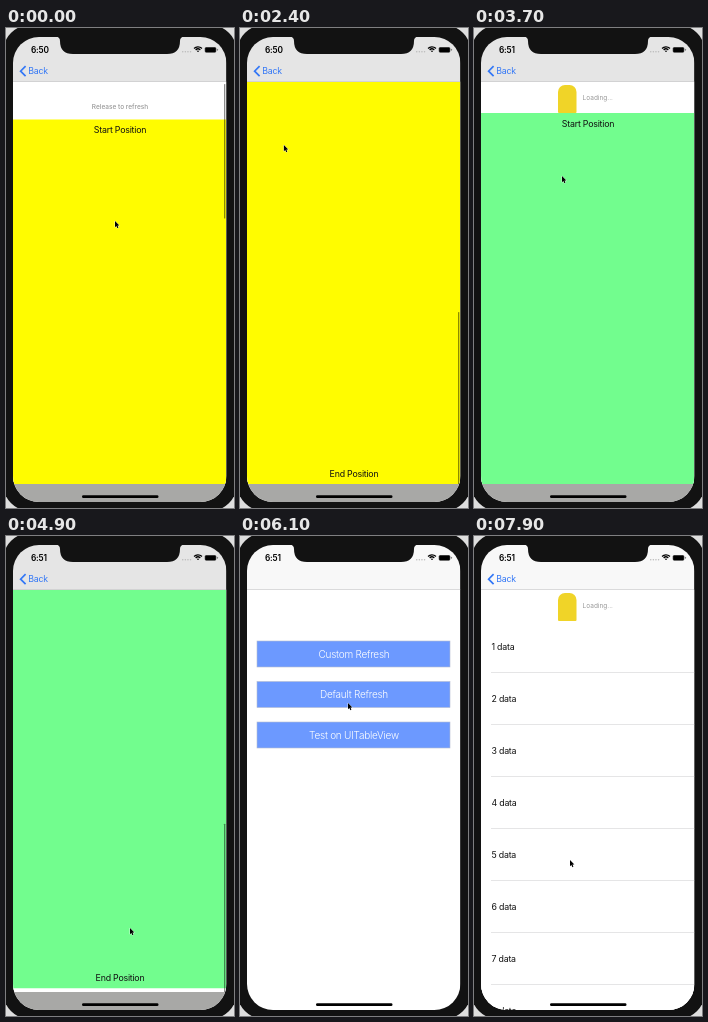
An HTML page with a canvas that plays this animation: 228 by 480 pixels, repeating every 8000 ms.

```html
<!DOCTYPE html>
<html lang="en">
<head>
<meta charset="utf-8">
<title>Pull to refresh demo</title>
<style>
  html, body { margin: 0; width: 100%; height: 100%; overflow: hidden; background: #dedede; }
  canvas { display: block; width: 228px; height: 480px; }
</style>
</head>
<body>
<canvas id="stage"></canvas>
<script>
const LOOP = 8000, STEP = 100, SLIDE = 460, PULL = 150;
const LEFT = 7, WIDTH = 213.4, TOP = 54, BOTTOM = 456, SCREEN_END = 474;
const CONTENT = 943, MAX = CONTENT - (BOTTOM - TOP), HEADER = 31;
const BEZEL = '#121212', BLUE = '#3478f6', INK = '#111', MUTED = '#999';

const canvas = document.getElementById('stage');
const ctx = canvas.getContext('2d');
const dpr = window.devicePixelRatio || 1;
canvas.width = 228 * dpr;
canvas.height = 480 * dpr;

// enter, pull and leave are start times; flick is the span of the scroll to the end.
const pages = [
  { color: '#fffc00', enter: -SLIDE, pull: -PULL, flick: [1000, 1980], leave: 2700 },
  { color: '#72fd8e', mascot: true, enter: 3200, pull: 3400, flick: [4400, 4976], leave: 5400 },
  { table: true, mascot: true, enter: 6500, pull: 7100, flick: [LOOP + 200, LOOP + 900], leave: LOOP }
];

// Time, x, y of the pointer's stops.
const stops = [
  [0, 109, 193], [1700, 116, 382], [2700, 24, 44], [3100, 42, 61], [3250, 94, 116], [3700, 88, 148],
  [4900, 124, 392], [5400, 24, 44], [6100, 108, 167], [6500, 108, 198], [7900, 96, 324]
];

function ramp(t, a, b) {
  const p = Math.min(1, Math.max(0, (t - a) / (b - a)));
  return p * p * (3 - 2 * p);
}

function slideOf(page, t) {
  const { enter, leave } = page;
  return WIDTH * (1 - ramp(t, enter, enter + SLIDE) + ramp(t, leave, leave + SLIDE));
}

function scrollOf(page, t) {
  const { pull, flick: [start, end] } = page;
  const open = ramp(t, pull, pull + PULL) - ramp(t, start - 200, start);
  const overshoot = 6.5 * Math.max(0, 1 - Math.abs(t - pull - PULL) / PULL);
  const down = (MAX + HEADER) * ramp(t, start, end);
  const footerClose = HEADER * ramp(t, end + 200, end + 400);
  return down - footerClose - HEADER * open - overshoot;
}

function pointer(t) {
  const i = Math.max(1, stops.findIndex(s => s[0] >= t));
  const [t0, x0, y0] = stops[i - 1], [t1, x1, y1] = stops[i];
  const p = ramp(t, t0, t1);
  return [x0 + (x1 - x0) * p, y0 + (y1 - y0) * p];
}

function box(x, y, w, h, fill) {
  ctx.fillStyle = fill;
  ctx.fillRect(x, y, w, h);
}

function round(x, y, w, h, r, fill) {
  ctx.beginPath();
  ctx.roundRect(x, y, w, h, r);
  ctx.fillStyle = fill;
  ctx.fill();
}

function text(str, x, y, size, fill, align = 'left', weight = 400) {
  ctx.font = `${weight} ${size}px Inter, "Liberation Sans", sans-serif`;
  ctx.letterSpacing = size > 7 ? `${-0.025 * size}px` : '0px';
  ctx.textAlign = align;
  ctx.fillStyle = fill;
  ctx.fillText(str, x, y + size * 0.36);
}

function clipTo(x, y, w, h, r, draw) {
  ctx.save();
  ctx.beginPath();
  ctx.roundRect(x, y, w, h, r);
  ctx.clip();
  draw();
  ctx.restore();
}

function menu(shift) {
  box(LEFT, TOP, WIDTH, SCREEN_END - TOP, '#fff');
  ['Custom Refresh', 'Default Refresh', 'Test on UITableView'].forEach((label, i) => {
    const y = 105 + i * 40.5;
    box(17 + shift, y, 193, 26, '#6c99ff');
    ctx.strokeStyle = '#b4bdd0';
    ctx.lineWidth = 0.6;
    ctx.strokeRect(17 + shift, y, 193, 26);
    text(label, 114 + shift, y + 13.2, 10, '#fff', 'center', 300);
  });
}

function header(page, t, top, pull) {
  const loading = t >= page.pull + PULL + 50;
  const label = loading ? 'Loading...' : pull >= HEADER ? 'Release to refresh' : 'Pull to refresh';
  if (page.mascot) {
    round(84, top - 28, 18.5, 28, [7, 7, 1, 1], '#f0d428');
    text(label, 108.6, top - 15.3, 6.5, MUTED);
  } else {
    text(label, 114, top - 12.9, 6.5, MUTED, 'center', 500);
  }
}

function scrollBar(scroll) {
  const over = Math.max(0, -scroll, scroll - MAX);
  const length = 172 - over;
  const y = 56 + Math.min(1, Math.max(0, scroll / MAX)) * (400 - length);
  round(218, y, 1.3, length, 0.6, 'rgba(0,0,0,.45)');
}

function rows(top) {
  for (let i = 0; i < 9; i++) {
    const y = top + i * 52;
    text(`${i + 1} data`, 17.5, y + 25.6, 8.8, INK);
    box(17, y + 51, 204, 0.6, '#d4d4d6');
  }
}

function block(page, t, scroll, top) {
  const end = top + CONTENT;
  box(LEFT, top, WIDTH, CONTENT, page.color);
  text('Start Position', 114, top + 10.4, 8.8, INK, 'center');
  text('End Position', 114, end - 10, 8.8, INK, 'center');
  if (scroll > MAX) text('Loading...', 114, end + 15, 6.5, MUTED, 'center');
  if (t >= page.flick[0] || -scroll > HEADER + 1) scrollBar(scroll);
}

function drawPage(page, t, slide) {
  const scroll = scrollOf(page, t), top = TOP - scroll;
  const bottom = page.table ? SCREEN_END : BOTTOM;
  ctx.save();
  ctx.translate(slide, 0);
  box(LEFT, TOP, WIDTH, SCREEN_END - TOP, page.table ? '#fff' : '#a8a8a6');
  clipTo(LEFT, TOP, WIDTH, bottom - TOP, 0, () => {
    box(LEFT, TOP, WIDTH, bottom - TOP, '#fff');
    if (page.table) rows(top);
    else block(page, t, scroll, top);
    if (scroll < 0) header(page, t, top, -scroll);
  });
  ctx.restore();
}

function navBar(page, slide) {
  const shown = 1 - slide / WIDTH;
  const grey = Math.round(248 - (page && !page.table ? 19 * shown : 0));
  box(LEFT, 9, WIDTH, TOP - 9, `rgb(${grey},${grey},${grey})`);
  box(LEFT, TOP - 0.6, WIDTH, 0.6, '#c6c6c8');
  ctx.globalAlpha = shown;
  ctx.strokeStyle = BLUE;
  ctx.lineWidth = 1.7;
  ctx.beginPath();
  ctx.moveTo(19.6, 38.2);
  ctx.lineTo(14.6, 43.2);
  ctx.lineTo(19.6, 48.2);
  ctx.stroke();
  text('Back', 22.3 + slide * 0.13, 43.2, 8.8, BLUE);
  ctx.globalAlpha = 1;
}

function statusBar(t) {
  text(t < pages[1].enter ? '6:50' : '6:51', 25, 21.8, 8.3, '#000', 'left', 600);
  for (let i = 0; i < 4; i++) round(176 + i * 2.6, 23, 1.5, 1.5, 0.7, '#bbb');
  ctx.strokeStyle = '#000';
  ctx.lineWidth = 1.3;
  for (let r = 1; r < 6; r += 2.2) {
    ctx.beginPath();
    ctx.arc(192, 24.2, r, -Math.PI * 0.76, -Math.PI * 0.24);
    ctx.stroke();
  }
  round(198.6, 18.9, 11.8, 5.8, 1.6, '#777');
  round(199.2, 19.4, 10.6, 4.8, 1, '#000');
  round(211, 20.8, 0.8, 2, 0.4, '#777');
}

function notch() {
  ctx.fillStyle = BEZEL;
  ctx.beginPath();
  ctx.moveTo(50, 8.5);
  ctx.quadraticCurveTo(54, 9, 54, 13);
  ctx.quadraticCurveTo(54, 26, 67, 26);
  ctx.lineTo(161, 26);
  ctx.quadraticCurveTo(174, 26, 174, 13);
  ctx.quadraticCurveTo(174, 9, 178, 8.5);
  ctx.fill();
}

function cursor(x, y) {
  ctx.save();
  ctx.translate(x, y);
  const arrow = new Path2D('M0 0V6.2L1.4 5L2.4 7.2L3.4 6.8L2.5 4.6H4.4Z');
  ctx.strokeStyle = 'rgba(255,255,255,.8)';
  ctx.lineWidth = 0.8;
  ctx.stroke(arrow);
  ctx.fillStyle = '#000';
  ctx.fill(arrow);
  ctx.restore();
}

function draw(t) {
  ctx.setTransform(dpr, 0, 0, dpr, 0, 0);
  box(0, 0, 228, 480, '#dedede');
  round(-3, -3, 234, 486, 27, BEZEL);
  const page = pages.find(p => t >= p.enter && t < p.leave + SLIDE);
  const slide = page ? slideOf(page, t) : WIDTH;
  clipTo(LEFT, 9, WIDTH, SCREEN_END - 9, 26, () => {
    menu((slide - WIDTH) * 0.3);
    if (page) drawPage(page, t, slide);
    navBar(page, slide);
    statusBar(t);
    round(76, 467.3, 76.5, 2.8, 1.4, '#000');
  });
  notch();
  cursor(...pointer(t));
}

const start = performance.now();
function tick() {
  const t = (performance.now() - start) % LOOP;
  draw(Math.floor(t / STEP) * STEP);
  requestAnimationFrame(tick);
}
tick();
</script>
</body>
</html>
```
